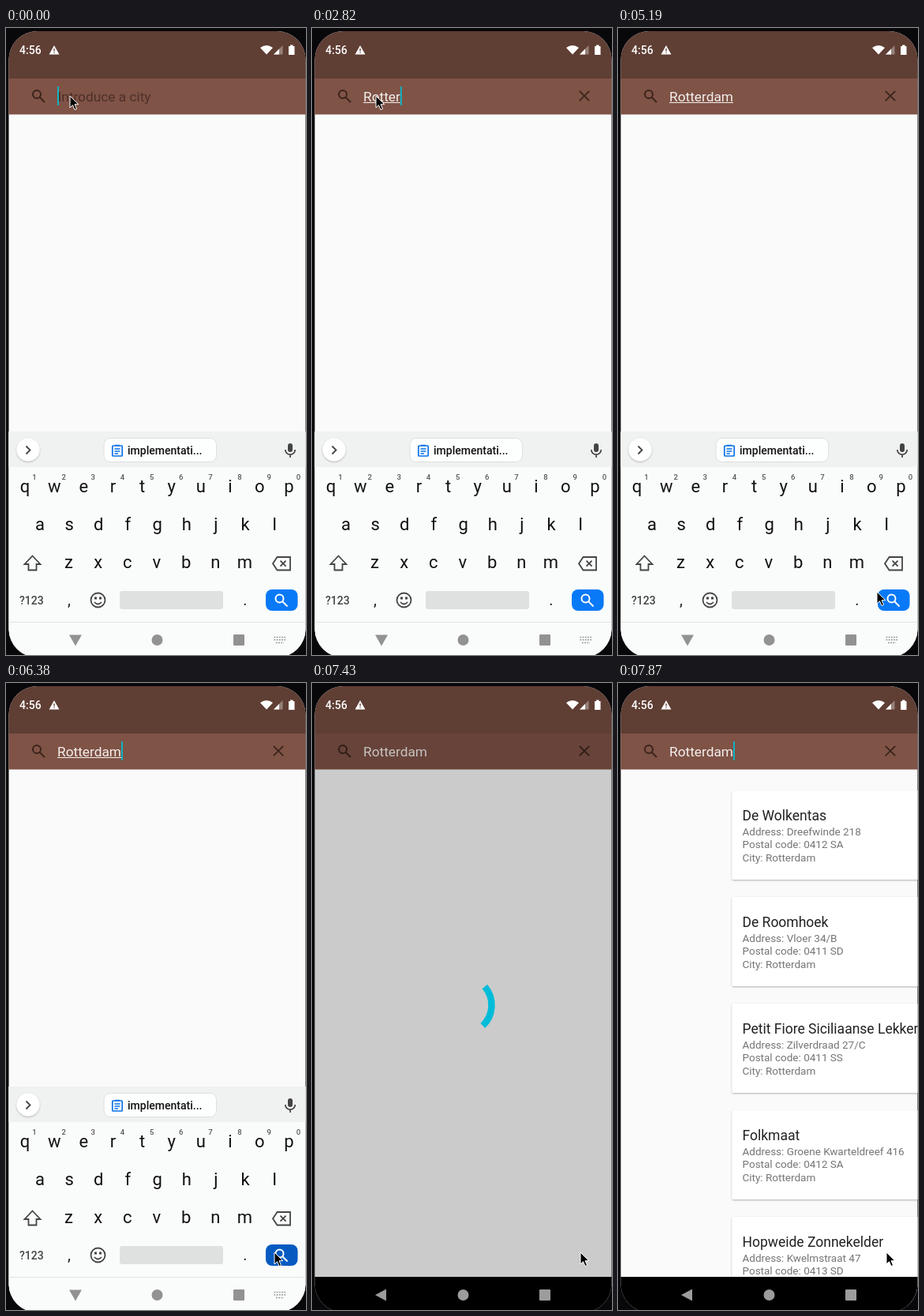
These frames come from a looping animation (380 px wide and 794 px high, 8000 ms). An HTML page:

```html
<!DOCTYPE html>
<html lang="en">
<head>
<meta charset="utf-8">
<title>City search</title>
<style>
html, body { margin: 0; width: 100%; height: 100%; overflow: hidden; background: #08080b; }
svg { display: block; width: 380px; height: 794px; font-family: Roboto, sans-serif; }
.line { fill: none; stroke-linecap: butt; }
</style>
</head>
<body>
<svg viewBox="0 0 380 794">
  <defs>
    <clipPath id="screen"><rect x="3.5" y="4" width="376" height="793" rx="36"/></clipPath>
    <filter id="shadow" x="-10%" y="-10%" width="120%" height="125%">
      <feDropShadow dx="0" dy="1" stdDeviation="1" flood-opacity=".3"/>
    </filter>
  </defs>
  <rect width="380" height="794" fill="#08080b"/>
  <g clip-path="url(#screen)">
    <rect y="4" width="380" height="790" fill="#fafafa"/>
    <rect y="4" width="380" height="60" fill="#5f3e34"/>
    <rect y="64" width="380" height="45.5" fill="#7f5346"/>
    <g fill="#fff">
      <text x="17" y="33" font-size="14" font-weight="500">4:56</text>
      <path d="M61 22L67.5 33.500H54.500Z"/>
      <path d="M60.400 26h1.300v3.500h-1.300zM60.400 30.500h1.300v1.300h-1.300z" fill="#5f3e34"/>
      <path d="M322 25Q330 19 338 25L330 33.500Z"/>
      <path d="M350.500 22V33.500H339Z" opacity=".35"/>
      <path d="M346 26.500V33.500H339Z"/>
      <path d="M360 21.500h3.500v1.500h2v11h-7.500v-11h2z"/>
    </g>
    <g class="line" stroke="#3a231b" stroke-width="2">
      <circle cx="39" cy="84" r="5"/>
      <path d="M42.600 87.600L49 94"/>
      <path id="clear" d="M338.800 79.800L351.200 92.200M351.200 79.800L338.800 92.200" stroke-width="1.800"/>
    </g>
    <text id="hint" x="65.500" y="93" font-size="17.300" fill="#4d3028">Introduce a city</text>
    <text id="query" x="65" y="93" font-size="17.300" fill="#f4efed"></text>
    <rect id="under" x="65" y="94" height="1" fill="#f4efed"/>
    <rect id="caret" y="74" width="2" height="24" fill="#12b2c1"/>
    <g id="cards"></g>
    <rect id="dim" y="64" width="380" height="688" opacity=".19"/>
    <path id="arc" class="line" stroke="#00bcd9" stroke-width="8.500"/>
    <g id="nav">
      <rect id="navBg" y="752" width="380" height="42"/>
      <path id="navLine" d="M0 752.500H380" stroke="#e2e4e3"/>
    </g>
    <g id="board">
      <rect id="boardBg" y="511" width="380" height="241" fill="#fafcfb"/>
      <rect id="strip" y="511" width="380" height="45" fill="#f0f2f1"/>
      <circle cx="28" cy="534" r="14.500" fill="#fff" filter="url(#shadow)"/>
      <path d="M25.500 529.500L30.500 534.500L25.500 539.500" class="line" stroke="#444" stroke-width="1.800"/>
      <rect x="124" y="519.500" width="142.500" height="30" rx="8" fill="#fdfefe" stroke="#dcdfde"/>
      <g class="line" stroke="#0b72e7" stroke-width="1.700">
        <rect x="134.800" y="529" width="12.400" height="13" rx="1"/>
        <path d="M138 528.500h6M137.500 533h7M137.500 536h7M137.500 539h4.500"/>
      </g>
      <text x="154" y="540" font-size="14" font-weight="500" fill="#111">implementati...</text>
      <rect x="357" y="526" width="6" height="11" rx="3" fill="#444"/>
      <path d="M353.800 534a6.200 6.200 0 0 0 12.400 0M360 540v4" class="line" stroke="#444" stroke-width="1.700"/>
      <g id="keys"></g>
      <path id="shift" d="M33.500 668.500L43.500 679H38.500V686.500H28.500V679H23.500Z" fill="none" stroke="#444" stroke-width="1.800"/>
      <path d="M343.500 670H360V686.500H343.500L338 678.200ZM347.500 674.700L354.500 681.700M354.500 674.700L347.500 681.700" class="line" stroke="#444" stroke-width="1.800"/>
      <text x="17" y="730" font-size="14" font-weight="500" fill="#444">?123</text>
      <g class="line" stroke="#444" stroke-width="1.800">
        <circle cx="116.500" cy="724.500" r="9"/>
        <path d="M112 727Q116.500 732 121 727"/>
      </g>
      <path d="M112 720.500h3v3h-3zM118 720.500h3v3h-3z" fill="#444"/>
      <rect x="144" y="713" width="131" height="23" rx="3" fill="#dfe1e0"/>
      <rect id="go" x="329" y="711" width="40.500" height="27" rx="8"/>
      <g class="line" stroke="#fff" stroke-width="2">
        <circle cx="346.500" cy="722.500" r="5"/>
        <path d="M350 726L356.500 732.500"/>
      </g>
    </g>
    <g id="badges">
      <circle cx="310.500" cy="693" r="10" fill="#1673e0"/>
      <circle cx="341" cy="693" r="10" fill="#1260bd"/>
      <g class="line" stroke="#fff" stroke-width="1.300">
        <rect x="306" y="688.500" width="9" height="9"/>
        <path d="M309 691.500l4 4M309 695v-3.500h3.500M335 693h9M341 689.500l3.500 3.500-3.500 3.500M346.500 688.500v9"/>
      </g>
    </g>
    <g id="icons">
      <path id="back"/>
      <circle cx="191.500" cy="775" r="7"/>
      <rect x="288" y="768" width="14" height="14" rx="1"/>
      <path id="dots" class="line" stroke="#929292" stroke-width="1.600" stroke-dasharray="1.800 1.400"
        d="M339.500 771.500H354.500M339.500 774.700H354.500M342 778.500h10"/>
    </g>
  </g>
  <path id="mouse" d="M0 0V15L3.500 11.700L6 17.500L8.500 16.400L6 10.700H10.800Z" fill="#000" stroke="#fff"/>
</svg>
<script>
const $ = id => document.getElementById(id);
const NS = 'http://www.w3.org/2000/svg';
const LOOP = 8000;

function add(parent, tag, attrs, text) {
  const el = document.createElementNS(NS, tag);
  set(el, attrs);
  if (text) el.textContent = text;
  parent.append(el);
  return el;
}
function set(el, attrs) {
  for (const k in attrs) el.setAttribute(k, attrs[k]);
}
const show = (id, on) => set($(id), { visibility: on ? 'visible' : 'hidden' });

// Keyboard letters
const letters = [];
[['qwertyuiop', 24, 587.5], ['asdfghjkl', 43, 636], ['zxcvbnm', 79.5, 684]].forEach(([row, x0, y], r) => {
  [...row].forEach((ch, i) => {
    const x = x0 + i * 37.15;
    letters.push(add($('keys'), 'text', { x, y, 'font-size': 22, 'text-anchor': 'middle', fill: '#111' }, ch));
    if (!r) add($('keys'), 'text', { x: x + 12, y: 572, 'font-size': 9.5, 'font-weight': 500, 'text-anchor': 'middle', fill: '#555' }, String((i + 1) % 10));
  });
});
for (const [x, ch] of [[80, ','], [303, '.']])
  add($('keys'), 'text', { x, y: 731, 'font-size': 20, 'text-anchor': 'middle', fill: '#222' }, ch);

// Result cards
[
  ['De Wolkentas', 'Dreefwinde 218', '0412 SA'],
  ['De Roomhoek', 'Vloer 34/B', '0411 SD'],
  ['Petit Fiore Siciliaanse Lekkernijen', 'Zilverdraad 27/C', '0411 SS'],
  ['Folkmaat', 'Groene Kwarteldreef 416', '0412 SA'],
  ['Hopweide Zonnekelder', 'Kwelmstraat 47', '0413 SD']
].forEach(([name, street, code], i) => {
  const y = 136 + i * 135;
  const card = $('cards');
  add(card, 'rect', { x: 144.5, y, width: 345, height: 113, rx: 2, fill: '#fff', filter: 'url(#shadow)' });
  add(card, 'text', { x: 157.5, y: y + 38, 'font-size': 17.5, fill: '#212121' }, name);
  [`Address: ${street}`, `Postal code: ${code}`, 'City: Rotterdam'].forEach((s, j) =>
    add(card, 'text', { x: 157.5, y: y + 57.3 + j * 16.1, 'font-size': 13.5, fill: '#757575' }, s));
});

// Timeline: [start time, value]
const typed = [[0, ''], [1490, 'R'], [2090, 'Ro'], [2230, 'Rot'], [2530, 'Rott'], [2680, 'Rotte'],
  [2820, 'Rotter'], [2970, 'Rotterm'], [3710, 'Rotter'], [3850, 'Rotterd'], [4000, 'Rotterda'], [4150, 'Rotterdam']];
const mousePos = [[0, [81, 86]], [4440, [67, 130]], [4590, [226, 629]], [4890, [268, 668]],
  [5040, [306, 698]], [5190, [328, 714]], [5340, [338, 721]], [5490, [340, 721]]];
const caretFlips = [300, 900, 1350, 1490, 4890, 5340, 5930, 6380, 6980, 7730];
const boardDrop = [[0, 0], [6530, 5], [6680, 150], [6830, 300]];

const at = (list, t) => list.reduce((v, [from, val]) => t >= from ? val : v, list[0][1]);
const within = (t, a, b) => t >= a && t < b;

// cubic-bezier(.4, 0, .2, 1)
function ease(x) {
  if (x <= 0 || x >= 1) return x <= 0 ? 0 : 1;
  let lo = 0, hi = 1, s = .5;
  for (let i = 0; i < 20; i++) {
    s = (lo + hi) / 2;
    const bx = 1.2 * s * (1 - s) ** 2 + .6 * s * s * (1 - s) + s ** 3;
    if (bx < x) lo = s; else hi = s;
  }
  return s * s * (3 - 2 * s);
}

function arcPath(t) {
  const step = 6530 + Math.floor((t - 6530) / 150) * 150;
  const e = 110 + (step - 6530) * .94;
  const half = 1333 / 2;
  const turn = -108 + e * .2555;
  const p = a => {
    const r = (turn + a) * Math.PI / 180;
    return `${191.5 + 36 * Math.cos(r)} ${408 + 36 * Math.sin(r)}`;
  };
  const from = 270 * ease(e / half - 1);
  const to = 270 * ease(e / half);
  return `M${p(from)}A36 36 0 ${to - from > 180 ? 1 : 0} 1 ${p(to)}`;
}

function draw(t) {
  const text = at(typed, t);
  const query = $('query');
  query.textContent = text;
  const width = text ? query.getComputedTextLength() : 0;
  show('hint', !text);
  show('clear', text);
  const late = within(t, 2970, 3260);
  set($('under'), { width: late ? 47 : width });
  show('under', t < 6530);
  set($('caret'), { x: 65 + width });
  show('caret', caretFlips.filter(f => t >= f).length % 2 === 0);

  const caps = within(t, 1350, 1640);
  for (const el of letters)
    el.textContent = caps ? el.textContent.toUpperCase() : el.textContent.toLowerCase();
  set($('shift'), { fill: caps ? '#444' : 'none' });
  set($('go'), { fill: within(t, 6080, 6530) ? '#075bc0' : '#0879f7' });

  const drop = at(boardDrop, t);
  const leaving = t >= 6530;
  const gone = t >= 6830;
  set($('board'), { transform: `translate(0 ${drop})` });
  show('board', !gone);
  set($('boardBg'), { fill: leaving ? '#f3f5f7' : '#fafcfb' });
  set($('strip'), { fill: leaving ? '#eceef0' : '#f0f2f1', y: leaving ? 513 : 511, height: leaving ? 43 : 45 });
  show('badges', within(t, 6530, 6680));

  set($('navBg'), { fill: gone ? '#000' : leaving ? '#e7e7e7' : '#fafcfb' });
  show('navLine', !leaving);
  set($('icons'), { fill: gone ? '#9c9c9c' : leaving ? '#adadad' : '#929292' });
  set($('back'), { d: leaving ? 'M80 775L94 767.500V782.500Z' : 'M80 768.500H96L88 782.500Z' });
  show('dots', !leaving);

  const busy = within(t, 6530, 7730);
  show('dim', busy);
  show('arc', busy);
  if (busy) set($('arc'), { d: arcPath(t) });
  show('cards', t >= 7870);

  set($('mouse'), { transform: `translate(${at(mousePos, t)})` });
}

const start = performance.now();
function tick() {
  draw((performance.now() - start) % LOOP);
  requestAnimationFrame(tick);
}
tick();
</script>
</body>
</html>
```
